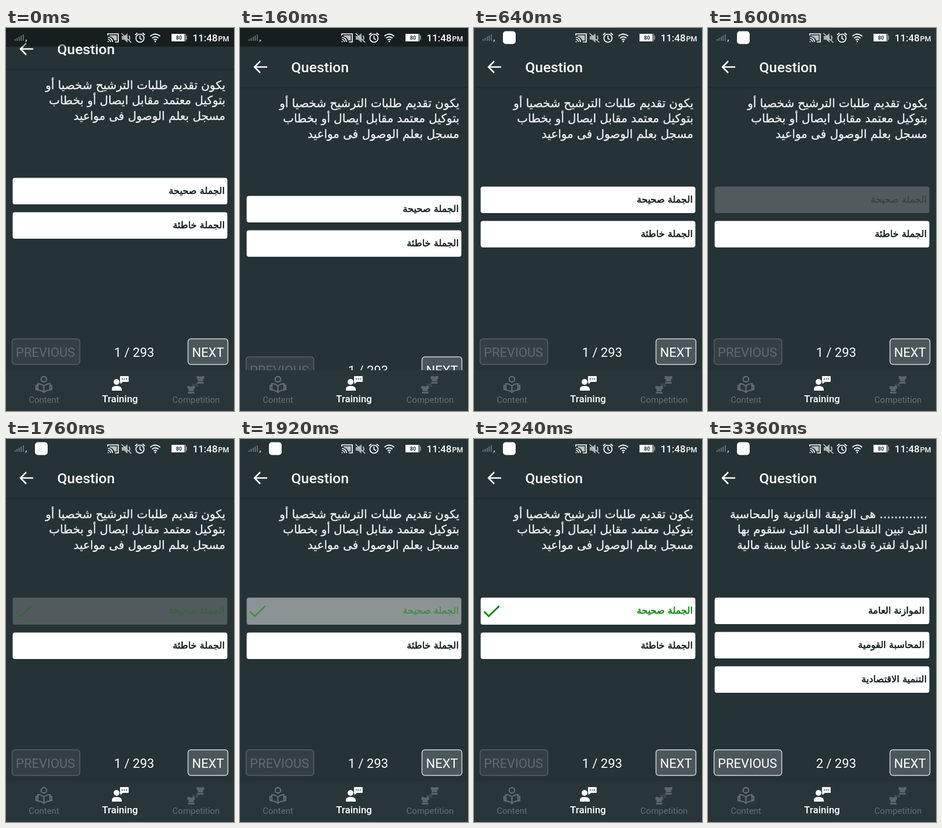
Recreate the animation shown at these times as an HTML page. Size 394 by 658 pixels, loop 4480 ms.

```html
<!DOCTYPE html>
<html lang="en">
<head>
<meta charset="utf-8">
<title>Quiz training</title>
<style>
  html, body { margin: 0; width: 100%; height: 100%; overflow: hidden; background: #253236; }
  svg { display: block; width: 394px; height: 658px; }
  text { font-family: Roboto, sans-serif; fill: #fff; }
  .ar { font-family: "DejaVu Sans", sans-serif; direction: rtl; stroke: currentColor; fill: currentColor; }
  .ask { font-size: 20px; color: #eef0f1; stroke-width: .4; }
  .opt { font-size: 16.2px; stroke-width: .6; }
  .btn rect { fill: #4b575b; stroke: #d3d7d8; stroke-width: 1.5; }
  .btn text, .count { font-size: 22px; }
  .off rect { fill: #333f43; stroke: #566164; }
  .off text { fill: #616b6f; }
  .mid { text-anchor: middle; }
  .line { fill: none; stroke: #fff; }
  .tab { font-size: 15px; fill: #667074; }
</style>
</head>
<body>
<svg viewBox="0 0 394 658">
  <defs>
    <clipPath id="view"><rect width="394" height="589"/></clipPath>
    <linearGradient id="shade" x2="0" y2="1">
      <stop stop-color="#000" stop-opacity=".16"/><stop offset="1" stop-color="#000" stop-opacity="0"/>
    </linearGradient>
    <g id="shirt"><path d="M0 0h4q2.500 2 5 0h4v5h-2v4H2V5H0z"/><rect x="1" y="10" width="11" height="3"/></g>
  </defs>
  <rect width="394" height="658" fill="#253236"/>
  <g clip-path="url(#view)">
    <g id="page">
      <rect y="101" width="394" height="4" fill="url(#shade)"/>
      <path class="line" stroke-width="2.500" d="M47 67H25M35 57L25 67l10 10"/>
      <text x="88.500" y="75.500" font-size="24.800" font-weight="500">Question</text>
      <g id="ask"></g>
    </g>
    <g id="opts"></g>
    <g id="foot">
      <g id="prev" class="btn"><rect x="10.500" y="534" width="117" height="44" rx="5"/><text x="17" y="564.500">PREVIOUS</text></g>
      <text id="count" class="count mid" x="221.500" y="564.500"></text>
      <g class="btn"><rect x="314.500" y="534" width="69" height="44" rx="5"/><text class="mid" x="349" y="564.500">NEXT</text></g>
    </g>
  </g>

  <rect id="bar" width="394" height="32" fill="#000" fill-opacity=".4"/>
  <g fill="#7b8487">
    <path d="M15 19h1.500v3H15zM18.500 17h1.500v5h-1.500zM22 15h1.500v7H22zM25.500 13h1.500v9h-1.500zM29 11h1.500v11H29z"/>
    <path d="M34 20h2v2l-1.500 2h-1z" fill="#bcc1c3"/>
  </g>
  <rect id="app" x="50" y="5.500" width="22" height="22" rx="5" fill="#fff"/>
  <g class="line" stroke-width="1.700">
    <path d="M176 13v-3h18v14h-6M176 16a8 8 0 0 1 8 8M176 19.500a4.500 4.500 0 0 1 4.500 4.500"/>
    <path d="M179 12.500h12.500v9H187a10 10 0 0 0-8-7z" fill="#bcc1c3" stroke="none"/>
    <circle cx="176.500" cy="23.500" r="1" fill="#fff" stroke="none"/>
    <path d="M200 14h4l6-5v16l-6-5h-4z" fill="#a8aeb0" stroke="none"/>
    <path d="M212.500 13q3 4 0 8M199.500 9l17 16" stroke="#c5c9cb"/>
    <circle cx="231.500" cy="17.500" r="7"/>
    <path d="M231.500 13v5l3.500 2M223 12l4-3.500M240 12l-4-3.500"/>
    <path d="M249.500 14q8.500-7 17 0M252.500 17.500q5.500-4.500 11 0M255.300 20.500q2.700-2.200 5.400 0"/>
    <circle cx="258" cy="23" r="1.500" fill="#fff" stroke="none"/>
  </g>
  <rect x="286" y="10" width="22" height="13" fill="#fff"/>
  <path d="M308 10h3v3h2v7h-2v3h-3z" fill="#798285"/>
  <text class="mid" x="299" y="20" style="font-size:9px;font-weight:700;fill:#253236">80</text>
  <text x="322.500" y="23" font-size="17" font-weight="500">11:48</text>
  <text x="366.500" y="23" font-size="12.500" font-weight="500">PM</text>

  <rect y="588" width="394" height="70" fill="#293639"/>
  <g class="line" style="stroke:#667074" stroke-width="2.200">
    <circle cx="65.500" cy="603.500" r="4.700"/>
    <path d="M65.500 615q-5-4-10.500-4v11q6 0 10.500 4 4.500-4 10.500-4v-11q-5.500 0-10.500 4v11M55 614h-3v7h3M76 614h3v7h-3"/>
  </g>
  <text class="tab mid" x="65.500" y="644">Content</text>
  <g fill="#fff">
    <circle cx="191" cy="608" r="5"/>
    <path d="M183 623v-3q0-5 8-5t9 5v3z"/>
    <path d="M198 598h13q1 0 1 1v8q0 1-1 1h-9l-4 3.500-1-3.500v-9q0-1 1-1z"/>
    <g fill="#253236"><circle cx="201" cy="603" r="1"/><circle cx="204.500" cy="603" r="1"/><circle cx="208" cy="603" r="1"/></g>
  </g>
  <text class="mid" x="197" y="643" font-size="17" font-weight="500">Training</text>
  <g fill="#5c666a"><use href="#shirt" x="329.500" y="598"/><use href="#shirt" x="313.500" y="615"/></g>
  <text class="mid" x="327" y="616" style="font-size:8px;fill:#667074">VS</text>
  <text class="tab mid" x="328.500" y="644">Competition</text>
</svg>
<script>
const LOOP = 4480;
const INK = "#111b1e";
const quiz = [
  {
    ask: ["يكون تقديم طلبات الترشيح شخصيا أو", "بتوكيل معتمد مقابل ايصال أو بخطاب", "مسجل بعلم الوصول فى مواعيد"],
    opts: [["الجملة صحيحة", 378], ["الجملة خاطئة", 378]]
  },
  {
    ask: ["............. هى الوثيقة القانونية والمحاسبة", "التى تبين النفقات العامة التى ستقوم بها", "الدولة لفترة قادمة تحدد غالبا بسنة مالية"],
    opts: [["الموازنة العامة", 374], ["المحاسبة القومية", 374], ["التنمية الاقتصادية", 378]]
  }
];

// Each step changes only the listed values; alpha and ink style the first answer.
const steps = [
  { at: 0, page: -31, opts: 257, foot: 0, bar: 1, app: 0, alpha: 1, ink: INK, right: 0, q: 0 },
  { at: 160, page: 0, opts: 288, foot: 31 },
  { at: 320, opts: 272, foot: 0, app: 1 },
  { at: 480, bar: 0 },
  { at: 1600, alpha: 0.2, ink: "#3a4447" },
  { at: 1760, ink: "#3b6242", right: 1 },
  { at: 1920, alpha: 0.47, ink: "#40904a" },
  { at: 2080, alpha: 0.96, ink: "#1c8c1e" },
  { at: 2240, alpha: 1, ink: "#0b870b" },
  { at: 3360, ink: INK, right: 0, q: 1 }
];

const $ = id => document.getElementById(id);
const move = (id, y) => $(id).setAttribute("transform", `translate(0 ${y})`);
const arabic = (kind, x, y, s, color = "") =>
  `<text class="ar ${kind}" x="${x}" y="${y}" style="color:${color}">${s}</text>`;

function option([label, x], i, s) {
  const first = i === 0;
  const picked = first && s.right;
  const y = i * 59 + (s.right && !first ? 1 : 0);
  const tick = picked ? `<path d="M17.500 24.500l8 8L43.500 15" fill="none" stroke="${s.ink}" stroke-width="3"/>` : "";
  return `<g transform="translate(0 ${y})">
    <rect x="11.5" y=".5" width="371" height="${picked ? 46.5 : 45.5}" rx="4" fill="#fff" opacity="${first ? s.alpha : 1}"/>
    ${tick}${arabic("opt", x, 28, label, first ? s.ink : INK)}</g>`;
}

function show(s) {
  const { ask, opts } = quiz[s.q];
  move("page", s.page);
  move("opts", s.opts);
  move("foot", s.foot);
  $("bar").setAttribute("opacity", s.bar);
  $("app").setAttribute("opacity", s.app);
  $("prev").setAttribute("class", s.q ? "btn" : "btn off");
  $("count").textContent = `${s.q + 1} / 293`;
  $("ask").innerHTML = ask.map((line, i) => arabic("ask", 379, 136 + i * 26.3, line)).join("");
  $("opts").innerHTML = opts.map((o, i) => option(o, i, s)).join("");
}

let last = -1;
const start = performance.now();
function tick(now) {
  const t = Math.max(0, now - start) % LOOP;
  const past = steps.filter(s => s.at <= t);
  if (past.length !== last) {
    last = past.length;
    show(Object.assign({}, ...past));
  }
  requestAnimationFrame(tick);
}
tick(start);
</script>
</body>
</html>
```
